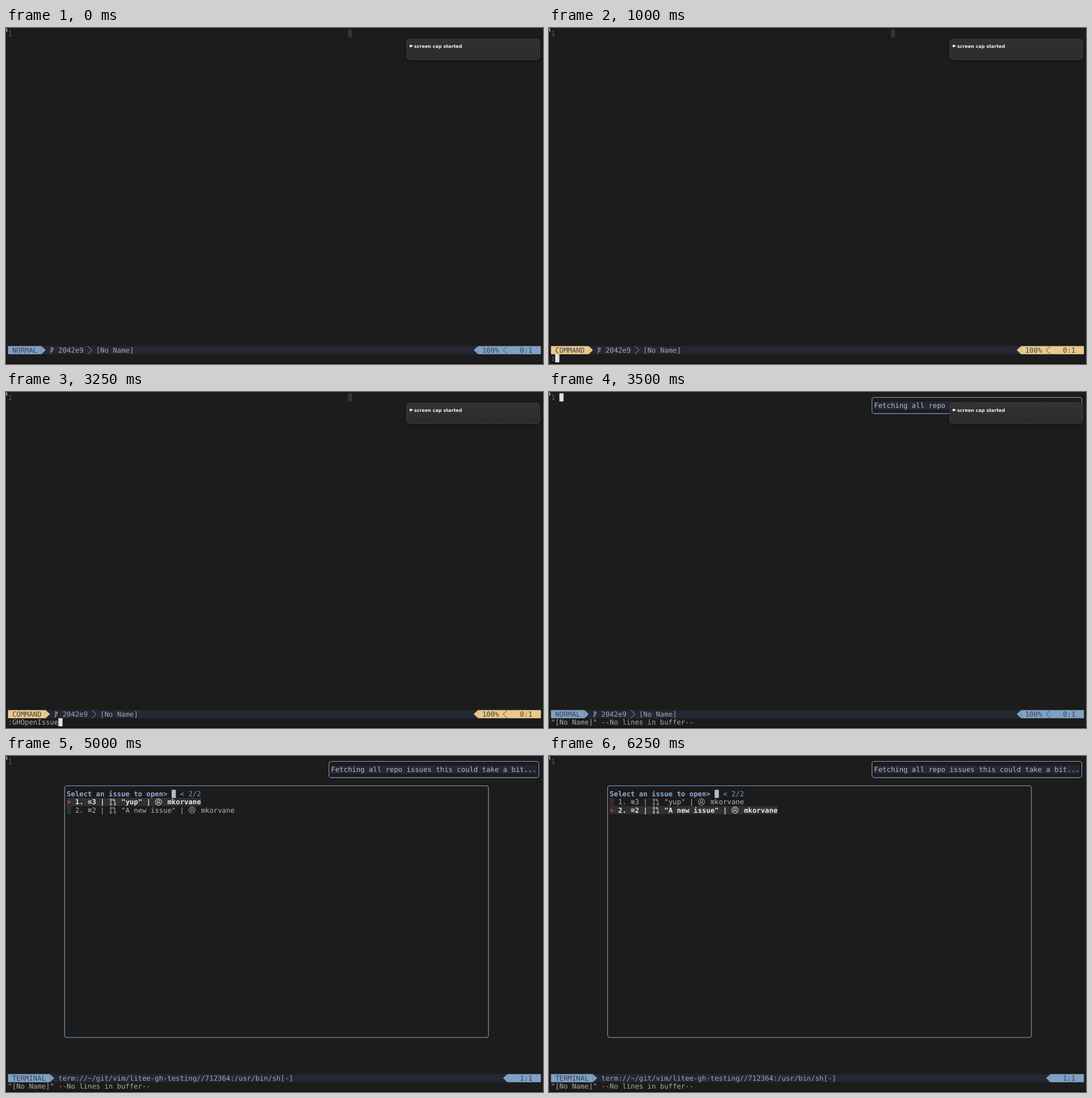
Animation, 947 px wide and 592 px high, one loop 8000 ms. Source, as an HTML page with a canvas:

```html
<!DOCTYPE html>
<html lang="en">
<head>
<meta charset="utf-8">
<title>Editor session</title>
<style>
html, body { margin: 0; width: 100%; height: 100%; overflow: hidden; background: #1c1c1c; }
canvas { position: absolute; left: 0; top: 0; width: 947px; height: 592px; }
</style>
</head>
<body>
<canvas id="stage"></canvas>
<script>
const W = 947, H = 592, LOOP = 8000;
const CELL = 7.4, ROW = 14.31, LEFT = 3.5, TOP = 2.35;
const STATUS = 39, CMD = 40;
const MONO = '12.29px "DejaVu Sans Mono", monospace';
const BG = '#1c1c1c', BAR = '#242833', BLUE = '#7fa1c3', GOLD = '#ebc98a';
const DARK = '#3b4252', GREY = '#a2a5af', PALE = '#b6bbc8', PLAIN = '#a9a9a9';
const HILITE = '#303030', CURSOR = '#e0e0e0';
const USER = 'mkorvane';

// Typed command: time and number of visible characters.
const COMMAND = ':GHOpenIssue';
const KEYS = [[1000, 1], [1250, 2], [1500, 3], [1750, 4], [2000, 5], [2250, 7], [2500, 8], [2750, 12]];

const canvas = document.getElementById('stage');
const ctx = canvas.getContext('2d');
const dpr = window.devicePixelRatio || 1;
canvas.width = Math.round(W * dpr);
canvas.height = Math.round(H * dpr);
ctx.scale(dpr, dpr);

const colX = c => LEFT + c * CELL;
const rowY = r => TOP + r * ROW;

function text(s, col, row, color, bold) {
  ctx.font = (bold ? 'bold ' : '') + MONO;
  ctx.textRendering = 'geometricPrecision';
  ctx.fillStyle = color;
  ctx.fillText(s, colX(col), rowY(row) + 11.41);
}

function cells(col, row, n, color) {
  ctx.fillStyle = color;
  ctx.fillRect(colX(col), rowY(row), n * CELL, ROW);
}

function path(points, color, width, fill) {
  ctx.beginPath();
  points.forEach(([x, y], i) => i ? ctx.lineTo(x, y) : ctx.moveTo(x, y));
  if (fill) {
    ctx.fillStyle = color;
    ctx.fill();
  } else {
    ctx.strokeStyle = color;
    ctx.lineWidth = width;
    ctx.stroke();
  }
}

function ring(x, y, r, from = 0, to = Math.PI * 2) {
  ctx.beginPath();
  ctx.arc(x, y, r, from, to);
  ctx.stroke();
}

// Powerline separator; dir is 1 when it points right, -1 when left.
function arrow(col, dir, color, solid) {
  const x = colX(dir > 0 ? col : col + 1), y = rowY(STATUS), tip = x + dir * CELL;
  path([[x, y], [tip, y + ROW / 2], [x, y + ROW]], color, 1, solid);
}

function frame(c0, r0, c1, r1) {
  const x = colX(c0 + 0.5), y = rowY(r0 + 0.5);
  ctx.strokeStyle = BLUE;
  ctx.lineWidth = 1.1;
  ctx.beginPath();
  ctx.roundRect(x, y, (c1 - c0) * CELL, (r1 - r0) * ROW, 4);
  ctx.stroke();
}

function branchIcon(col) {
  const x = colX(col), y = rowY(STATUS);
  path([[x + 1.9, y + 1.6], [x + 1.9, y + 13.2]], GREY, 1.1);
  path([[x + 1.9, y + 10.6], [x + 4.8, y + 8.2], [x + 4.8, y + 3.5]], GREY, 1.1);
  path([[x + 2.8, y + 5], [x + 4.8, y + 2], [x + 6.8, y + 5]], GREY, 1, true);
}

function hashIcon(col, row, color, width) {
  const x = colX(col), y = rowY(row);
  for (const d of [2.3, 5.1]) {
    path([[x + d, y + 3.6], [x + d, y + 11]], color, width);
    path([[x + 0.2, y + d + 3.6], [x + 7.2, y + d + 3.6]], color, width);
  }
}

function pullIcon(col, row, color) {
  const x = colX(col) + 2, y = rowY(row) + 1;
  ctx.strokeStyle = color;
  ctx.lineWidth = 1;
  ring(x + 1.8, y + 2.2, 1.5);
  ring(x + 1.8, y + 10.4, 1.5);
  ring(x + 8.8, y + 10.4, 1.5);
  path([[x + 1.8, y + 3.8], [x + 1.8, y + 8.8]], color, 1);
  path([[x + 8.8, y + 8.8], [x + 8.8, y + 2.4], [x + 5.4, y + 2.4]], color, 1);
  path([[x + 7.2, y + 0.2], [x + 5, y + 2.4], [x + 7.2, y + 4.6]], color, 1);
}

function userIcon(col, row, color) {
  const x = colX(col) + 6.4, y = rowY(row) + 7;
  ctx.strokeStyle = color;
  ctx.lineWidth = 1;
  ring(x, y, 5.6);
  ring(x, y - 1.1, 2.3);
  ring(x, y + 5, 3.9, Math.PI * 1.1, Math.PI * 1.9);
}

function statusBar(mode, color, terminal) {
  const end = mode.length + 2;
  cells(0, STATUS, 127, BAR);
  cells(0, STATUS, end, color);
  text(mode, 1, STATUS, DARK);
  arrow(end, 1, color, true);
  if (terminal) {
    text('term://~/git/vim/litee-gh-testing//712364:/usr/bin/sh[-]', 12, STATUS, GREY);
    cells(119, STATUS, 8, color);
    arrow(118, -1, color, true);
    text('1:1', 122, STATUS, DARK);
    return;
  }
  branchIcon(end + 2);
  text('2042e9', end + 4, STATUS, GREY);
  arrow(end + 11, 1, GREY);
  text('[No Name]', end + 13, STATUS, GREY);
  cells(112, STATUS, 15, color);
  arrow(111, -1, color, true);
  text('100%', 113, STATUS, DARK);
  arrow(118, -1, DARK);
  text('0:1', 122, STATUS, DARK);
}

function issue(row, num, id, title, selected, pointer) {
  const color = selected ? '#e8e8e8' : '#b2b2b2';
  const bar = title.length + 30;
  cells(14, row, selected ? bar + 13 - 14 : 1, HILITE);
  if (selected) text('>', 14, row, pointer, true);
  text(num + '.', 16, row, color, selected);
  hashIcon(19, row, color, 0.9);
  text(id + ' |', 20, row, color, selected);
  pullIcon(24, row, color);
  text('"' + title + '" |', 27, row, color, selected);
  userIcon(bar + 2, row, color);
  text(USER, bar + 5, row, color, selected);
}

function picker(t) {
  const second = t >= 6250;
  const pointer = second ? '#d6336c' : '#e0404f';
  text('Select an issue to open>', 14, 4, '#87afd7', true);
  cells(39, 4, 1, PALE);
  text('<', 41, 4, '#78a9d4');
  text('2/2', 43, 4, t < 5250 ? '#58a6da' : '#60a3e0');
  issue(5, 1, 3, 'yup', !second, pointer);
  issue(6, 2, 2, 'A new issue', second, pointer);
}

function toast() {
  const fill = ctx.createLinearGradient(0, 19, 0, 56);
  fill.addColorStop(0, 'rgba(51,51,51,.96)');
  fill.addColorStop(1, 'rgba(45,45,45,.96)');
  ctx.save();
  ctx.shadowColor = 'rgba(0,0,0,.65)';
  ctx.shadowBlur = 5 * dpr;
  ctx.shadowOffsetY = dpr;
  ctx.beginPath();
  ctx.roundRect(706.5, 19.5, 235, 36.5, 6);
  ctx.fillStyle = fill;
  ctx.fill();
  ctx.restore();
  ctx.strokeStyle = '#454545';
  ctx.lineWidth = 0.8;
  ctx.stroke();
  ctx.fillStyle = '#f2f2f2';
  ctx.fillRect(711.8, 29.8, 3.8, 3.8);
  path([[715, 31.6], [717.2, 30.2], [717.2, 33]], '#f2f2f2', 1, true);
  ctx.font = 'bold 8px "DejaVu Sans", sans-serif';
  ctx.fillText('screen cap started', 719.8, 34.5);
}

function commandLine(t) {
  const n = KEYS.filter(k => k[0] <= t).pop()[1];
  text(COMMAND.slice(0, n), 0, CMD, PLAIN);
  if (t < 3000 || t >= 3250) cells(n, CMD, 1, CURSOR);
}

function draw(t) {
  const typing = t >= 1000 && t < 3500, opened = t >= 3500, terminal = t >= 3750;
  ctx.fillStyle = BG;
  ctx.fillRect(0, 0, W, H);
  ctx.fillStyle = '#160f11';
  ctx.fillRect(0, 590, W, 2);
  path([[0, 1], [1.2, 1.6], [1.2, 5], [2.8, 5.6]], '#d8d8d8', 1.2);
  text('1', 0, 0, '#5a5a5a');

  if (typing) statusBar('COMMAND', GOLD);
  else if (terminal) statusBar('TERMINAL', BLUE, true);
  else statusBar('NORMAL', BLUE);

  if (!opened) cells(81, 0, 1, '#2d3640');
  if (typing) commandLine(t);
  else if (!terminal && (opened || Math.floor(t / 250) % 2)) cells(2, 0, 1, CURSOR);

  if (opened) {
    text('"[No Name]" --No lines in buffer--', 0, CMD, PLAIN);
    cells(77, 1, 49, BAR);
    frame(76, 0, 126, 2);
    text('Fetching all repo issues this could take a bit...', 77, 1, PALE);
  }
  if (terminal) {
    frame(13, 3, 114, 34);
    if (t < 5000) cells(14, 4, 1, PALE);
    else picker(t);
  }
  if (t < 5000) toast();
}

let start;
function tick(now) {
  if (start === undefined) start = now;
  draw((now - start) % LOOP);
  requestAnimationFrame(tick);
}
draw(0);
requestAnimationFrame(tick);
</script>
</body>
</html>
```
